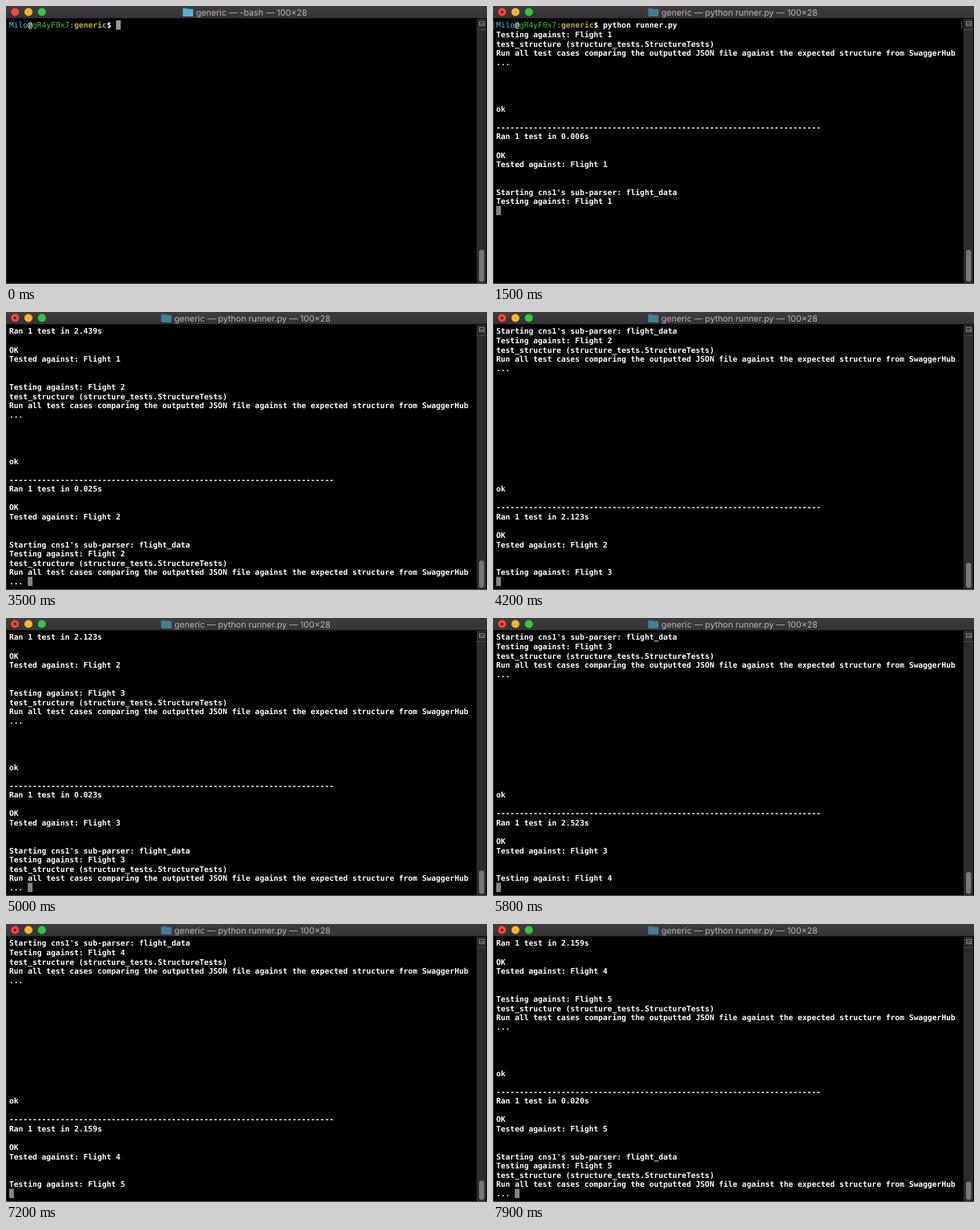
An HTML page with a canvas that plays this animation: 600 by 347 pixels, repeating every 8 s.

```html
<!DOCTYPE html>
<html lang="en">
<head>
<meta charset="utf-8">
<title>Terminal test run</title>
<style>
  html, body { margin: 0; width: 100%; height: 100%; overflow: hidden; background: #000; }
  canvas { display: block; }
</style>
</head>
<body>
<canvas id="stage" width="600" height="347"></canvas>
<script>
const ctx = document.getElementById('stage').getContext('2d');
const LOOP = 8000, ENTER = 1000;
const ROWS = 28, COL = 5.792, ROW = 11.576, LEFT = 4, TOP = 18, BASELINE = 9.49;
const MONO = '9.62px "DejaVu Sans Mono", monospace';
const COMMAND = 'python runner.py';
const PROMPT = [
  ['Milo', '#4fc3d9'], ['@', '#fff', 'bold'], ['gR4yF0x7', '#35c92f'],
  [':', '#c9c9a0'], ['generic', '#b9b52c', 'bold'], ['$ ', '#fff', 'bold']
];
const PROMPT_LENGTH = PROMPT.reduce((n, [text]) => n + text.length, 0);

// Output log: every line carries the time at which it is printed.
const log = [];
const print = (time, ...lines) => lines.forEach(text => log.push({ time, text }));
const blanks = n => Array(n).fill('');
const testHeader = [
  'test_structure (structure_tests.StructureTests)',
  'Run all test cases comparing the outputted JSON file against the expected structure from SwaggerHub',
  '... '
];
const testResult = (gap, seconds, flight) => [
  ...blanks(gap), 'ok', '', '-'.repeat(70), `Ran 1 test in ${seconds}s`, '',
  'OK', `Tested against: Flight ${flight}`, '', ''
];

// Per flight: start, structure result, sub-parser test start, and both durations.
const flights = [
  [1100, 1500, 2100, '0.006', '2.439'],
  [2900, 3200, 3400, '0.025', '2.123'],
  [4100, 4600, 5000, '0.023', '2.523'],
  [5700, 6100, 6400, '0.021', '2.159'],
  [7100, 7500, 7800, '0.020']
];
flights.forEach(([start, result, parser, quick, slow], i) => {
  const n = i + 1, testing = `Testing against: Flight ${n}`;
  print(start, testing);
  print(result, ...testHeader, ...testResult(4, quick, n),
    "Starting cns1's sub-parser: flight_data", testing);
  print(parser, ...testHeader);
  if (slow) print(flights[n][0], ...testResult(12, slow, n));
});

function rect(x, y, w, h, color, radius = 0) {
  ctx.fillStyle = color;
  ctx.beginPath();
  ctx.roundRect(x, y, w, h, radius);
  ctx.fill();
}

function dot(x, y, r, color) {
  ctx.fillStyle = color;
  ctx.beginPath();
  ctx.arc(x, y, r, 0, 2 * Math.PI);
  ctx.fill();
}

function write(text, col, row, color = '#fff', weight = 'bold') {
  ctx.font = `${weight} ${MONO}`;
  ctx.fillStyle = color;
  ctx.fillText(text, LEFT + col * COL, Math.round(TOP + row * ROW + BASELINE));
}

function drawTitleBar(running) {
  const shade = ctx.createLinearGradient(0, 0, 0, 15);
  shade.addColorStop(0, '#3e3c3e');
  shade.addColorStop(1, '#353335');
  rect(0, 0, 600, 15, shade);
  rect(0, 15, 600, 1, '#0c0c0c');
  ['#fc4640', '#fdb52b', '#30c644'].forEach((color, i) => dot(11.3 + 16.7 * i, 7.5, 5, color));
  if (running) dot(11.3, 7.5, 1.7, '#7c0f0b');

  const folderX = running ? 193.5 : 220.5;
  rect(folderX, 2.5, 6, 4, running ? '#376f82' : '#4a9dbd', 1);
  rect(folderX, 3.8, 13, 9.2, running ? '#437f94' : '#58b2d4', 1);
  ctx.font = '10.65px Inter, sans-serif';
  ctx.fillStyle = '#b7b5b7';
  ctx.fillText(`generic — ${running ? COMMAND : '-bash'} — 100×28`, running ? 210 : 237, 12);
}

function drawScrollBar(scroll) {
  rect(587, 16, 12, 331, '#2c2c2c');
  rect(587, 29, 12, 1, '#484848');
  ctx.strokeStyle = '#808080';
  ctx.lineWidth = 1;
  ctx.strokeRect(590.5, 19.5, 6, 5);
  rect(591, 22, 5, 1, '#808080');
  const height = 8820 / (220 + scroll);
  rect(590, 344.3 - height, 6.5, height, '#777', 3.2);
}

function draw(t) {
  const running = t >= ENTER;
  const typed = running ? COMMAND.length
    : Math.min(COMMAND.length, Math.round(Math.floor(t / 100) * COMMAND.length / 9));
  const printed = log.filter(line => line.time <= t);
  const last = printed.at(-1);
  const waiting = last && last.text === '... ';

  let cursorRow = 0, cursorCol = PROMPT_LENGTH + typed;
  if (running) {
    cursorRow = printed.length + (waiting ? 0 : 1);
    cursorCol = waiting ? 4 : 0;
  }
  const scroll = Math.max(0, cursorRow - ROWS + 1);

  rect(0, 0, 600, 347, '#000');
  rect(LEFT + cursorCol * COL, TOP + (cursorRow - scroll) * ROW, 5.9, 11.6, running ? '#858585' : '#989898');

  if (scroll === 0) {
    let col = 0;
    for (const [text, color, weight = 'normal'] of PROMPT) {
      write(text, col, 0, color, weight);
      col += text.length;
    }
    write(COMMAND.slice(0, typed), col, 0);
    if (running) {
      write('[', -1, 0, '#777', 'normal');
      write(']', 99.75, 0, '#777', 'normal');
    }
  }
  printed.forEach(({ text }, i) => {
    const row = i + 1 - scroll;
    if (text && row >= 0) write(text, 0, row);
  });

  drawScrollBar(scroll);
  drawTitleBar(running);
  rect(0, 16, 0.7, 331, '#3a3a3a');
  rect(0, 346, 600, 1, '#4a4a4a');
}

ctx.textRendering = 'geometricPrecision';
const begin = performance.now();
function frame() {
  draw((performance.now() - begin) % LOOP);
  requestAnimationFrame(frame);
}
frame();
</script>
</body>
</html>
```
